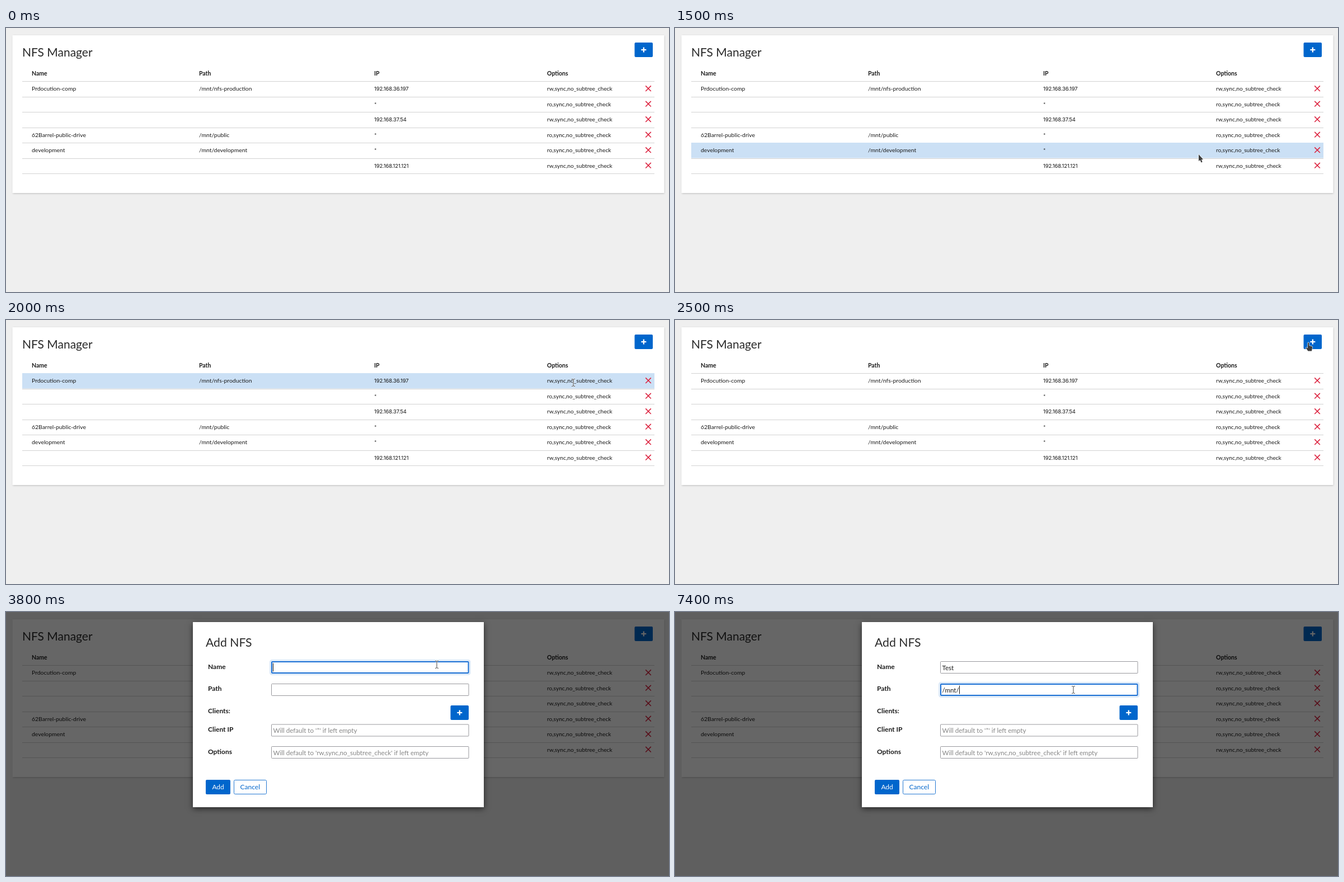
An HTML page with a canvas for the animation above (8 s loop, 1185 by 472 pixels).

```html
<!DOCTYPE html>
<html lang="en">
<head>
<meta charset="utf-8">
<title>NFS Manager</title>
<style>
  html, body { margin: 0; width: 100%; height: 100%; overflow: hidden; background: #efefef; }
  canvas { display: block; width: 1185px; height: 472px; }
</style>
</head>
<body>
<canvas id="stage"></canvas>
<script>
const W = 1185, H = 472, LOOP = 8000, STEP = 100;
const BLUE = '#0066cc', INK = '#1b1b1b';
const FACE = 'Lato, "Open Sans", sans-serif';
const DIALOG_AT = 2800, FOCUS_AT = 3800, NEXT_FIELD_AT = 5600;

const canvas = document.getElementById('stage');
const ctx = canvas.getContext('2d');
const ratio = window.devicePixelRatio || 1;
canvas.width = W * ratio;
canvas.height = H * ratio;

const columns = [46, 345, 658, 967];
const rows = [
  ['Prdocution-comp', '/mnt/nfs-production', '192.168.36.197', 'rw'],
  ['', '', '*', 'ro'],
  ['', '', '192.168.37.54', 'rw'],
  ['62Barrel-public-drive', '/mnt/public', '*', 'ro'],
  ['development', '/mnt/development', '*', 'ro'],
  ['', '', '192.168.121.121', 'rw']
];
const rowTop = i => Math.round(95 + 27.5 * i);

// Pointer hot spot: time, x, y
const path = [
  [300, 175, 464], [500, 424, 412], [700, 640, 358], [900, 795, 316], [1100, 884, 293],
  [1500, 936, 226], [1800, 985, 153], [2000, 1014, 112], [2300, 1094, 62], [2500, 1132, 40],
  [2800, 1132, 40], [3100, 1060, 48], [3500, 840, 82], [3800, 770, 94],
  [5000, 770, 94], [5300, 714, 134], [5500, 714, 134], [5600, 712, 139]
];

// Keystrokes: time at which each character appears
const nameKeys = [4600, 4900, 5000, 5200];
const pathKeys = [6500, 6800, 7000, 7200, 7400];
const typed = (word, keys, t) => word.slice(0, keys.filter(k => t >= k).length);

function pointerAt(t) {
  if (t < path[0][0]) return null;
  const next = path.findIndex(p => p[0] > t);
  if (next < 0) return path[path.length - 1].slice(1);
  const [t0, x0, y0] = path[next - 1], [t1, x1, y1] = path[next];
  const k = (t - t0) / (t1 - t0);
  return [x0 + (x1 - x0) * k, y0 + (y1 - y0) * k];
}

function text(str, x, y, size, { weight = 400, color = INK, align = 'left', face = FACE, spacing = 0 } = {}) {
  ctx.font = `${weight} ${size}px ${face}`;
  ctx.letterSpacing = spacing + 'px';
  ctx.fillStyle = color;
  ctx.textAlign = align;
  ctx.fillText(str, x, y);
}

function box(x, y, w, h, r, fill, stroke, line = 1) {
  ctx.beginPath();
  ctx.roundRect(x, y, w, h, r);
  if (fill) { ctx.fillStyle = fill; ctx.fill(); }
  if (stroke) { ctx.strokeStyle = stroke; ctx.lineWidth = line; ctx.stroke(); }
}

function shadowBox(x, y, w, h, color, blur, dy) {
  ctx.save();
  ctx.shadowColor = color;
  ctx.shadowBlur = blur * ratio;
  ctx.shadowOffsetY = dy * ratio;
  box(x, y, w, h, 0, '#fff');
  ctx.restore();
}

function plusButton(x, y) {
  box(x, y, 32.5, 26, 2, BLUE);
  const cx = x + 16.3, cy = y + 13;
  ctx.fillStyle = '#fff';
  ctx.fillRect(cx - 4.5, cy - 1.1, 9, 2.2);
  ctx.fillRect(cx - 1.1, cy - 4.5, 2.2, 9);
}

function cross(cx, cy) {
  ctx.strokeStyle = '#dc2440';
  ctx.lineWidth = 1.6;
  ctx.beginPath();
  for (const s of [-1, 1]) {
    ctx.moveTo(cx - 4.8, cy - 4.8 * s);
    ctx.lineTo(cx + 4.8, cy + 4.8 * s);
  }
  ctx.stroke();
}

function drawPage(hovered) {
  ctx.fillStyle = '#efefef';
  ctx.fillRect(0, 0, W, H);
  shadowBox(11.5, 13, 1165, 282, 'rgba(0,0,0,.22)', 3, 1);
  text('NFS Manager', 29, 51, 21, { color: '#2a2a2a' });
  plusButton(1123.5, 26);
  ['Name', 'Path', 'IP', 'Options'].forEach((label, i) =>
    text(label, columns[i], 85, 10.5, { weight: 700 }));

  if (hovered >= 0) {
    ctx.fillStyle = '#cbe0f5';
    ctx.fillRect(29, rowTop(hovered), 1130, 27.5);
  }
  rows.forEach(([name, dir, ip, mode], i) => {
    const y = 112.3 + 27.5 * i;
    text(name, columns[0], y, 10.4);
    text(dir, columns[1], y, 10.4);
    if (ip === '*') text(ip, columns[2], y, 10.4);
    else text(ip, columns[2], y, 9.6, { face: 'Inter, sans-serif', spacing: -0.2 });
    text(mode + ',sync,no_subtree_check', columns[3], y, 10.2);
    cross(1148, 108.2 + 27.5 * i);
  });
  ctx.fillStyle = '#d2d2d2';
  for (let i = 0; i <= rows.length; i++)
    if (i !== hovered) ctx.fillRect(29, rowTop(i), 1130, 1);
}

function field(y, value, placeholder, focused) {
  const x = 474.5, w = 352.5, h = 21;
  if (focused) {
    box(x - 2, y - 2, w + 4, h + 4, 3, null, 'rgba(0,102,204,.14)', 3);
    box(x + 0.5, y + 0.5, w - 1, h - 1, 1, '#fff', '#1a6fd4', 2);
  } else {
    box(x, y, w, h, 1, '#fff', '#98989d');
  }
  text(value || placeholder, 477.5, y + 15.2, 11.6, { color: value ? INK : '#858585' });
  if (focused) {
    const end = 477 + (value ? ctx.measureText(value).width + 0.5 : 0);
    ctx.fillStyle = '#111';
    ctx.fillRect(Math.round(end), y + 3, 1, 15);
  }
}

function drawDialog(t) {
  ctx.fillStyle = 'rgba(0,0,0,.6)';
  ctx.fillRect(0, 0, W, H);
  shadowBox(334, 18, 520, 331, 'rgba(0,0,0,.6)', 10, 3);
  text('Add NFS', 357, 62, 21.2, { color: '#2a2a2a' });
  [['Name', 101.7], ['Path', 141.3], ['Clients:', 180.5], ['Client IP', 214], ['Options', 253.5]]
    .forEach(([label, y]) => text(label, 361, y, 12, { weight: 700 }));

  const onPath = t >= NEXT_FIELD_AT;
  field(88.5, typed('Test', nameKeys, t), '', t >= FOCUS_AT && !onPath);
  field(128.5, typed('/mnt/', pathKeys, t), '', onPath);
  field(201, '', "Will default to '*' if left empty");
  field(240.5, '', "Will default to 'rw,sync,no_subtree_check' if left empty");

  plusButton(794.5, 167);
  box(357, 300, 44, 26, 2, BLUE);
  text('Add', 379, 317.2, 11.9, { color: '#fff', align: 'center' });
  box(407.5, 300.5, 58, 25, 2, '#fff', '#2478d2');
  text('Cancel', 436.3, 317.2, 12, { color: BLUE, align: 'center' });
}

function outline(shape, fill) {
  ctx.lineJoin = 'round';
  ctx.lineWidth = 1.4;
  ctx.strokeStyle = 'rgba(255,255,255,.85)';
  ctx.stroke(shape);
  ctx.fillStyle = fill;
  ctx.fill(shape);
}

const arrow = new Path2D('M0 0 L0 12 L2.6 9.9 L4.4 14.5 L6.6 13.6 L4.8 9.2 L8 8.9 Z');
const hand = new Path2D('M-1 1 Q0 -.6 1.2 1 L1.4 6 L6 7 Q7.4 7.5 7 9.6 L6 15.5 L-.6 15.5 L-4 10.5 Q-4.4 8.8 -2.8 9.2 L-1 10.6 Z');
const beam = new Path2D('M-3 -6.5 Q-.8 -6.5 0 -5.5 Q.8 -6.5 3 -6.5 M0 -5.5 L0 5.5 M-3 6.5 Q-.8 6.5 0 5.5 Q.8 6.5 3 6.5');

function drawPointer(x, y, kind) {
  ctx.save();
  ctx.translate(x, y);
  if (kind === 'beam') {
    ctx.strokeStyle = 'rgba(255,255,255,.7)';
    ctx.lineWidth = 2.4;
    ctx.stroke(beam);
    ctx.strokeStyle = '#444';
    ctx.lineWidth = 1;
    ctx.stroke(beam);
  } else {
    outline(kind === 'hand' ? hand : arrow, '#3d3d3d');
  }
  ctx.restore();
}

function pointerKind(x, y, dialog) {
  const inside = (l, t, r, b) => x >= l && x <= r && y >= t && y <= b;
  if (dialog) return inside(474, 88, 827, 110) || inside(474, 128, 827, 150) ? 'beam' : 'arrow';
  if (inside(1123, 26, 1156, 52)) return 'hand';
  return inside(967, 95, 1084, 260) ? 'beam' : 'arrow';
}

function draw(t) {
  ctx.setTransform(ratio, 0, 0, ratio, 0, 0);
  const dialog = t >= DIALOG_AT;
  const pointer = pointerAt(t);
  const row = pointer && !dialog ? Math.floor((pointer[1] - 95) / 27.5) : -1;
  drawPage(row < rows.length ? row : -1);
  if (dialog) drawDialog(t);
  if (pointer) drawPointer(...pointer, pointerKind(...pointer, dialog));
}

function tick() {
  const t = performance.now() % LOOP;
  draw(Math.floor(t / STEP) * STEP);
  requestAnimationFrame(tick);
}
tick();
</script>
</body>
</html>
```
